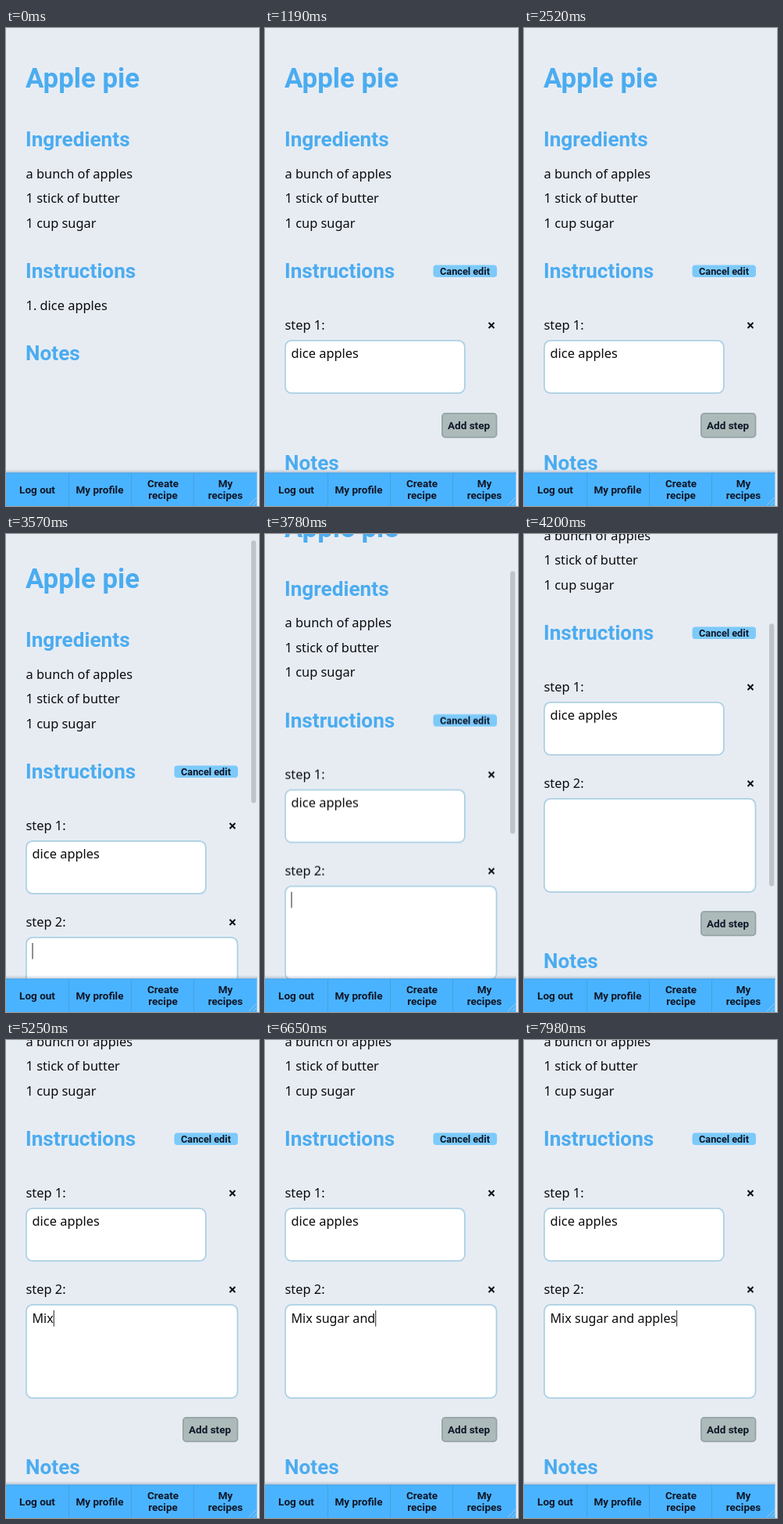
Write an HTML page that moves like this. It is 324 px wide and 610 px high and loops after 8 s.

```html
<!DOCTYPE html>
<html lang="en">
<head>
<meta charset="utf-8">
<title>Recipe editor</title>
<style>
  @property --scroll { syntax: "<number>"; inherits: true; initial-value: 0; }

  html, body { margin: 0; width: 100%; height: 100%; overflow: hidden; background: #e7ecf3; }
  svg { display: block; width: 324px; height: 610px; animation: scroll 8s infinite; }

  text { font: 16.4px "Noto Sans", "Open Sans", sans-serif; fill: #0b0b0e; white-space: pre; }
  .title, .head, .btn, .nav text { font-family: Roboto, "Open Sans", sans-serif; font-weight: 700; }
  .title { font-size: 34.8px; fill: #4bacf0; }
  .head { font-size: 26.2px; fill: #4bacf0; }
  .btn, .nav text { font-size: 13.5px; fill: #0e1626; text-anchor: middle; }
  .small { font-size: 12.7px; }
  .typed { font-size: 16.1px; }
  .field { fill: #fff; stroke: #acd0e4; stroke-width: 1.8; }
  .cross { stroke: #0b0b0e; stroke-width: 2; }

  .page { transform: translateY(calc(var(--scroll) * -1px)); }
  .thumb { fill: #bfc3ca; transform: translateY(calc(var(--scroll) * .6px)); animation: thumb 8s infinite; }
  .view { animation: view 8s step-end infinite; }
  .edit { animation: edit 8s step-end infinite; }
  .added { animation: added 8s step-end infinite; }
  .below { animation: below 8s step-end infinite; }
  .caret { fill: #222; animation: blink 8s step-end infinite; }

  @keyframes view { 0% { opacity: 1 } 13.125%, 100% { opacity: 0 } }
  @keyframes edit { 0% { opacity: 0 } 13.125%, 100% { opacity: 1 } }
  @keyframes added { 0% { opacity: 0 } 38.5%, 100% { opacity: 1 } }
  @keyframes below { 0% { transform: none } 38.5%, 100% { transform: translateY(174px) } }
  @keyframes blink { 0% { opacity: 1 } 51.625% { opacity: 0 } 57.75%, 100% { opacity: 1 } }
  @keyframes thumb {
    0%, 43.74% { opacity: 0 }
    43.75%, 59.5% { opacity: 1 }
    63%, 100% { opacity: 0 }
  }
  /* the picture advances every 70 ms */
  @keyframes scroll {
    0%, 43.75% { --scroll: 0; animation-timing-function: step-end }
    44.625% { --scroll: 7; animation-timing-function: steps(5) }
    49% { --scroll: 116; animation-timing-function: steps(2) }
    50.75% { --scroll: 160; animation-timing-function: steps(2) }
    52.5%, 100% { --scroll: 184 }
  }
</style>
</head>
<body>
<svg viewBox="0 0 324 610">
  <defs>
    <path id="cross" class="cross" d="M286.5 -3.5l7 7m0 -7l-7 7"/>
    <linearGradient id="shade" x1="0" y1="0" x2="0" y2="1">
      <stop offset="0" stop-color="#5a6b80" stop-opacity="0"/>
      <stop offset="1" stop-color="#5a6b80" stop-opacity=".3"/>
    </linearGradient>
  </defs>
  <rect width="324" height="610" fill="#e7ecf3"/>

  <g class="page">
    <text class="title" x="25" y="76">Apple pie</text>
    <text class="head" x="25" y="151">Ingredients</text>
    <text x="25.5" y="191.7">a bunch of apples</text>
    <text x="25.5" y="223">1 stick of butter</text>
    <text x="25.5" y="254.5">1 cup sugar</text>
    <text class="head" x="25" y="319">Instructions</text>

    <g class="view">
      <text x="25.5" y="360">1. dice apples</text>
      <text class="head" x="25" y="424">Notes</text>
    </g>

    <g class="edit">
      <rect x="215.5" y="302.5" width="81.5" height="15.5" rx="4" fill="#7ccafa"/>
      <text class="btn small" x="256" y="314.7">Cancel edit</text>

      <text x="25.5" y="385">step 1:</text>
      <use href="#cross" y="379.5"/>
      <rect class="field" x="25.9" y="398.9" width="230" height="67" rx="8"/>
      <text x="33.5" y="421">dice apples</text>

      <g class="added">
        <text x="25.5" y="508">step 2:</text>
        <use href="#cross" y="502.5"/>
        <rect class="field" x="25.9" y="521.9" width="270.6" height="119" rx="8"/>
        <text id="typed" class="typed" x="33.5" y="544.5"></text>
        <rect id="caret" class="caret" x="33.5" y="529" width="1" height="20.5"/>
      </g>

      <g class="below">
        <rect x="226.9" y="491.9" width="69.6" height="30.4" rx="4" fill="#acbaba" stroke="#96a4a5" stroke-width="1.8"/>
        <text class="btn" x="261" y="511.8">Add step</text>
        <text class="head" x="25" y="564">Notes</text>
      </g>
    </g>
  </g>

  <rect class="thumb" x="314" y="4" width="6.3" height="335" rx="3.1"/>

  <g class="nav">
    <rect y="563" width="322" height="4.5" fill="url(#shade)"/>
    <rect y="567.5" width="321.5" height="42.5" fill="#4ab3ff"/>
    <path d="M0 568h321.5M80.5 568v42M160.5 568v42M240.5 568v42" fill="none" stroke="#46a0e2"/>
    <text x="40" y="593.8">Log out</text>
    <text x="120" y="593.8">My profile</text>
    <text x="201" y="585.7">Create</text>
    <text x="201" y="600.7">recipe</text>
    <text x="281" y="585.7">My</text>
    <text x="281" y="600.7">recipes</text>
    <path d="M311 609l10.5 -10.5M316.5 609l5 -5" stroke="#a9c6da"/>
  </g>
</svg>

<script>
  const LOOP = 8000;
  const phrase = "Mix sugar and apples".replaceAll(" ", "\u00a0");
  // when each letter is typed, in ms
  const keys = [4760, 4970, 5180, 5600, 5670, 5810, 5950, 6160, 6230, 6300,
                6370, 6510, 6650, 6790, 6930, 7070, 7280, 7420, 7560, 7770];
  const typed = document.getElementById("typed");
  const caret = document.getElementById("caret");
  const start = performance.now();
  let shown = -1;

  function draw() {
    const t = (performance.now() - start) % LOOP;
    const count = keys.filter(k => k <= t).length;
    if (count !== shown) {
      shown = count;
      typed.textContent = phrase.slice(0, count);
      const width = count ? typed.getComputedTextLength() : 0;
      caret.setAttribute("x", 33.5 + width);
    }
    requestAnimationFrame(draw);
  }
  draw();
</script>
</body>
</html>
```
